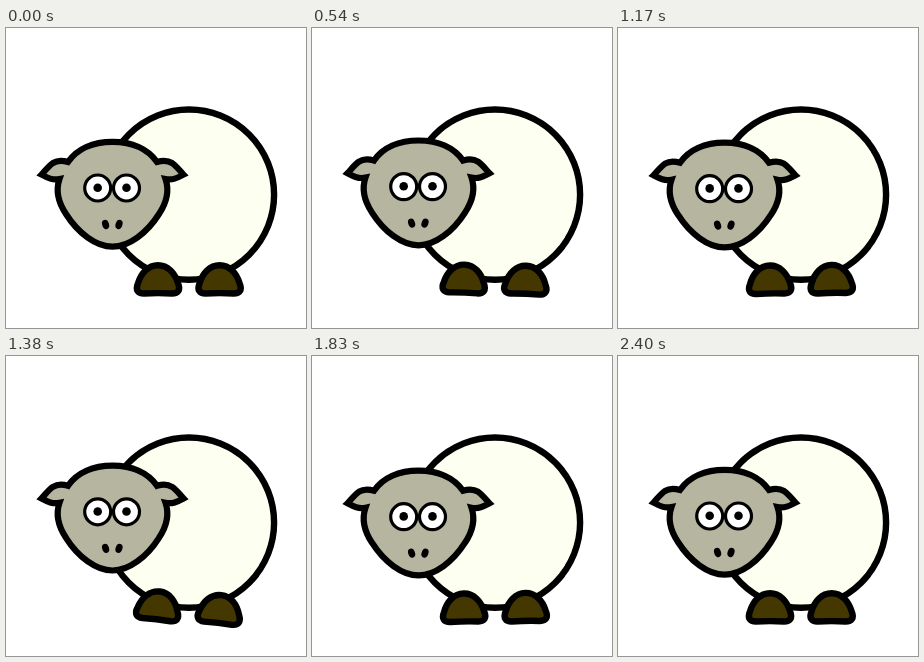
These frames come from a looping animation (300 px wide and 300 px high, 2.47 s). An HTML page:

```html
<!DOCTYPE html>
<html lang="en">
<head>
<meta charset="utf-8">
<title>Dancing sheep</title>
<style>
  html, body { margin: 0; height: 100%; overflow: hidden; background: #fff; }
  svg { display: block; width: 100%; height: 100%; }
</style>
</head>
<body>
<svg viewBox="0 0 300 300" stroke="#000" stroke-width="6.4">
  <defs>
    <path id="foot" fill="#443700" d="M0-15C10-15 17-7 20 3C23 10 20 13.300 14 13.300Q0 12.600 -14 13.300C-20 13.300 -23 10 -20 3C-17-7 -10-15 0-15Z"/>
    <g id="eye">
      <circle r="13" fill="#fff" stroke-width="3.2"/>
      <circle cy="-.3" r="4.3" fill="#000" stroke="none"/>
    </g>
    <ellipse id="nostril" rx="3.4" ry="4.7" fill="#000" stroke="none"/>
  </defs>
  <circle cx="183" cy="166.6" r="85.1" fill="#fdfff0"/>
  <use id="left" href="#foot"/>
  <use id="right" href="#foot"/>
  <g id="head">
    <path fill="#b6b59f" stroke-width="6.2" d="M106.5 113.9C87 113.900 71 121 62 134C57 132.500 51 132.500 47 135C42 138.500 39 143 35.500 146.600C41 149.500 46 152.500 53.500 151C49 164 54 177 60 186C72 205 90 218.700 106.500 218.700S141 205 153 186C159 177 164 164 159.500 151C167 152.500 172 149.500 177.500 146.600C174 143 171 138.500 166 135C162 132.500 156 132.500 151 134C142 121 126 113.900 106.500 113.900Z"/>
    <use href="#eye" x="91.7" y="160"/>
    <use href="#eye" x="120.5" y="160"/>
    <use href="#nostril" transform="translate(99.600 196.500) rotate(-20)"/>
    <use href="#nostril" transform="translate(113 196.500) rotate(20)"/>
  </g>
</svg>
<script>
  const LOOP = 2470, STEP = 30, LAST = 80, BEAT = 300;
  const [head, left, right] = ["head", "left", "right"].map(id => document.getElementById(id));

  // Triangle wave: 0, 1, 0, -1 on successive beats.
  const sway = t => {
    const beat = (t / BEAT + 1) % 4;
    return 1 - Math.abs(beat - 2);
  };

  function placeFoot(foot, x, lift, tilt) {
    foot.setAttribute("transform", `translate(${x} ${252.2 - 3 * lift}) rotate(${11 * tilt})`);
  }

  function draw(now) {
    const t = Math.min(Math.floor((now % LOOP) / STEP), LAST) * STEP;
    const lift = sway(t);
    head.setAttribute("transform", `translate(0 ${-7 * lift})`);
    placeFoot(left, 152, lift, lift);
    placeFoot(right, 213.6, -lift, lift);
    requestAnimationFrame(draw);
  }
  draw(0);
</script>
</body>
</html>
```
